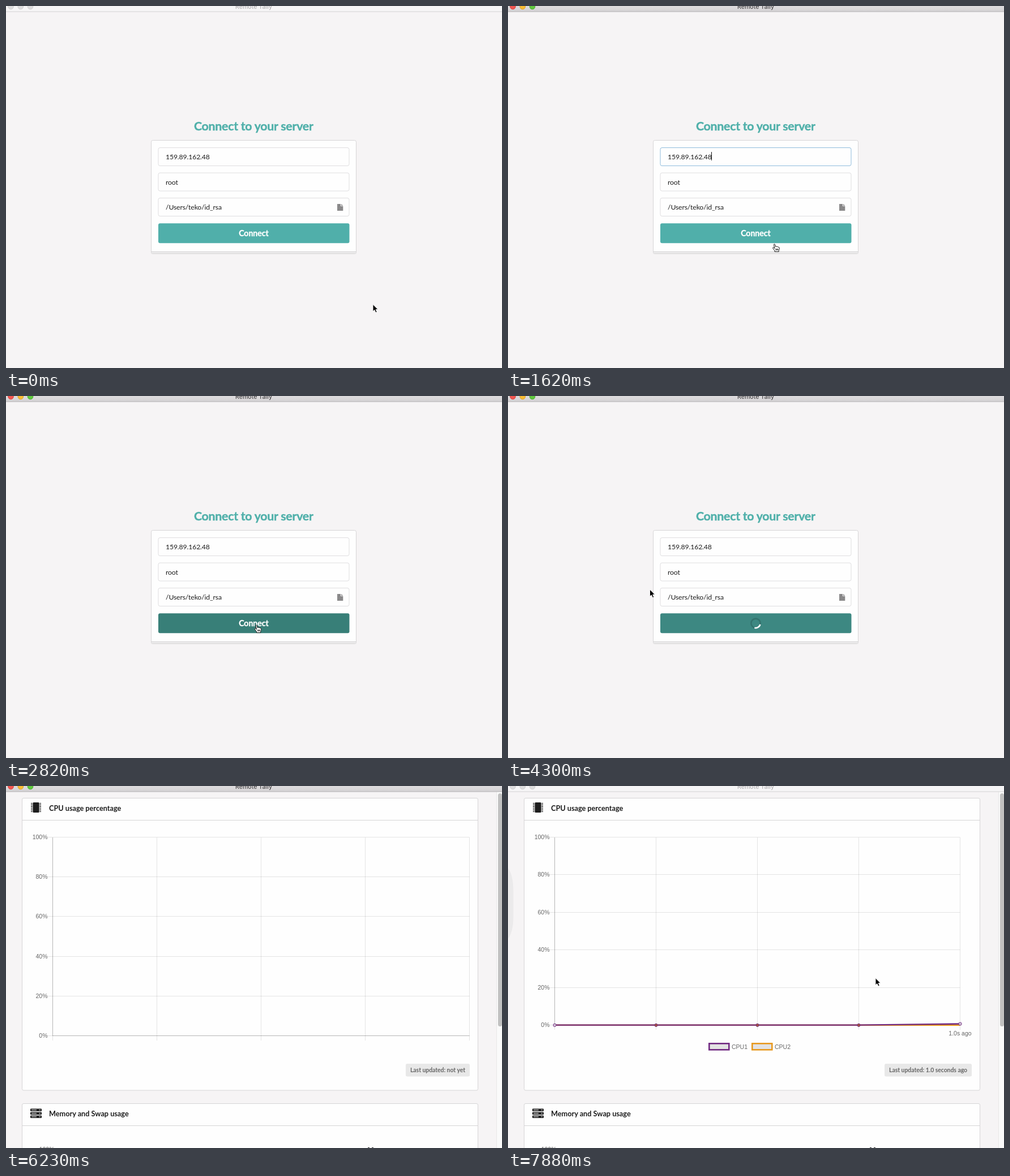
These frames come from a looping animation (876 by 640 pixels, 8000 ms). An HTML page:

```html
<!DOCTYPE html>
<html lang="en">
<head>
<meta charset="utf-8">
<title>Remote Tally</title>
<style>
  html, body { margin: 0; width: 100%; height: 100%; overflow: hidden; background: #f6f4f5; }
  svg { display: block; width: 100%; height: 100%; }
  text { font-family: Lato, sans-serif; fill: #1d1d1d; }
  .window-title { font: 500 10.6px Inter, sans-serif; text-anchor: middle; fill: #474547; }
  .inactive .window-title { fill: #b3b1b3; }
  .bar { fill: url(#bar); }
  .inactive .bar { fill: #f6f5f6; }
  .bar-line { fill: #b4b2b4; }
  .inactive .bar-line { fill: #d3d2d3; }
  .inactive .light { fill: #dddcdd; stroke: #d0cfd0; }
  .card { fill: #fefefe; stroke: #d6d5d6; }
  .field { fill: #fefefe; stroke: #dfdee0; }
  .value { font-size: 12.26px; letter-spacing: -.15px; }
  .heading {
    font-size: 21.4px; font-weight: 700; letter-spacing: -.3px; text-anchor: middle;
    fill: #50b0aa; stroke: #50b0aa; stroke-width: .4;
  }
  .action {
    font-size: 14.2px; font-weight: 700; letter-spacing: -.1px; text-anchor: middle;
    fill: #fff; stroke: #fff; stroke-width: .3;
  }
  .card-title { font-size: 12.7px; font-weight: 700; }
  .badge { font-size: 10.5px; font-weight: 700; letter-spacing: -.07px; fill: #666; text-anchor: end; }
  .chart text { font: 10.5px "Liberation Sans", Arial, sans-serif; fill: #666; }
  .grid { stroke: #000; stroke-opacity: .1; fill: none; }
  .axis { stroke: #000; stroke-opacity: .2; fill: none; }
</style>
</head>
<body>
<svg viewBox="0 0 876 640">
  <defs>
    <linearGradient id="bar" x2="0" y2="1">
      <stop stop-color="#dedcde"/><stop offset="1" stop-color="#d3d1d3"/>
    </linearGradient>
  </defs>
  <rect width="876" height="640" fill="#f6f4f5"/>

  <g id="login">
    <text class="heading" x="437.3" y="219.5">Connect to your server</text>
    <rect x="256" y="240" width="363" height="198.5" rx="3" fill="#000" opacity=".1"/>
    <rect class="card" x="256.5" y="237.5" width="362" height="199.5" rx="3"/>
    <path d="M257 434.5H618.5" stroke="#d0cfd0"/>
    <rect x="257" y="435" width="361" height="2" fill="#efeeef"/>
    <rect class="field" id="host" x="269" y="250.5" width="337" height="32" rx="3"/>
    <rect class="field" x="269" y="295" width="337" height="32" rx="3"/>
    <rect class="field" x="269" y="339.5" width="337" height="32" rx="3"/>
    <text class="value" x="282" y="270.5">159.89.162.48</text>
    <text class="value" x="282" y="315.5">root</text>
    <text class="value" x="282" y="360">/Users/teko/id_rsa</text>
    <rect id="caret" x="359" y="258" width="1" height="15" fill="#111"/>
    <path d="M585 350h6v4h4.3v8h-10.3zM592 350l3.3 3.2h-3.3z" fill="#8a898a"/>
    <rect id="button" x="269" y="384.3" width="337.5" height="35" rx="3"/>
    <text class="action" id="label" x="437.4" y="406.5">Connect</text>
    <g id="spinner" fill="none" stroke-width="2.7">
      <circle cx="437.5" cy="401.8" r="8.2" stroke="#000" stroke-opacity=".15"/>
      <path id="arc" d="M431.7 396a8.2 8.2 0 0 1 11.6 0" stroke="#fff"/>
    </g>
  </g>

  <g id="dashboard">
    <rect x="866" y="10" width="10" height="630" fill="#fafafa"/>
    <path d="M866.5 10V640" stroke="#e8e7e8"/>
    <rect x="869" y="13" width="7" height="412" rx="3.5" fill="#c1c1c1"/>
    <rect class="card" x="28.5" y="21.5" width="805" height="516.5" rx="2.5"/>
    <rect class="card" x="28.5" y="561.5" width="805" height="100" rx="2.5"/>
    <path d="M28 60.5H833M28 600.5H833" stroke="#d6d5d6"/>
    <g stroke="#1d1d1d" fill="#1d1d1d">
      <rect x="47.5" y="29.5" width="11" height="17" rx="1"/>
      <path d="M53 30V47" stroke-width="18" stroke-dasharray="1.3 1.5"/>
    </g>
    <path d="M47 29V47.5M59 29V47.5" stroke="#fefefe" stroke-width=".8"/>
    <g id="server"></g>
    <text class="card-title" x="76" y="44">CPU usage percentage</text>
    <text class="card-title" x="76" y="584">Memory and Swap usage</text>
    <g class="chart"><text x="58.7" y="645.5">100%</text></g>
    <path d="M639 639h3v1h-3zM646 639h3v1h-3z" fill="#222"/>
    <g id="empty" class="chart"></g>
    <g id="filled" class="chart"></g>
    <rect id="badge-box" y="491" height="22.5" rx="2.5" fill="#e8e8e8"/>
    <text class="badge" id="badge" x="811" y="505.8"></text>
    <path id="overlay" d="M0 145Q9.5 158 9.5 187V230Q9.5 258 0 270Z" fill="#ebeaeb"/>
  </g>

  <g id="frame">
    <rect class="bar" width="876" height="10"/>
    <rect class="bar-line" y="9.5" width="876" height="1"/>
    <circle class="light" cx="8.5" cy="1" r="4.8" fill="#f25650" stroke="#dd4640"/>
    <circle class="light" cx="25.8" cy="1" r="4.8" fill="#f8bc33" stroke="#dfa023"/>
    <circle class="light" cx="43" cy="1" r="4.8" fill="#5fc93e" stroke="#4aad2d"/>
    <text class="window-title" x="437.5" y="5.3">Remote Tally</text>
  </g>

  <g id="cursor" stroke-linejoin="round">
    <path id="arrow" d="M0 0V12.5L2.9 9.9 5 14.6 7.2 13.6 5.2 9.1H9Z" fill="#000" stroke="#fff" stroke-width=".9"/>
    <path id="hand" d="M4 14.3V12.5C2.5 10.5 1.5 9.5.8 8.2.2 7 1.7 6.2 2.6 7.2L4 8.7 2.5 2.4C2.1.6 4 .2 4.5 1.8L5.7 5.7C6.2 4.6 7.7 4.7 8 5.9 8.6 5 10 5.3 10.2 6.5 11.2 5.9 12.3 6.5 12.3 7.8 12.5 10 11.7 11.5 11.2 12.6V14.3Z M6.2 9V12M8 9V12M9.8 9V12" fill="#fff" stroke="#111"/>
  </g>
</svg>

<script>
const DURATION = 8000, TICK = 148.5;
const $ = id => document.getElementById(id);
const show = (id, on) => { $(id).style.display = on ? '' : 'none'; };
const latest = (steps, t) => steps.findLast(step => step[0] <= t);

// time, x, y, shape
const cursorSteps = [
  [0, 648, 527.5, 'arrow'], [1040, 637, 520, 'arrow'], [1190, 603, 497, 'arrow'],
  [1340, 552, 467, 'arrow'], [1480, 503, 440, 'arrow'], [1620, 467, 420, 'hand'],
  [1770, 449, 410, 'hand'], [1920, 441, 406, 'hand'], [2070, 438.5, 404, 'hand'],
  [3110, 436, 402, 'arrow'], [3260, 415, 394, 'arrow'], [3410, 368, 377, 'arrow'],
  [3560, 312, 360, 'arrow'], [3710, 270, 349, 'arrow'], [3850, 251, 345, 'arrow'],
  [4000, 240, 343, 'arrow'], [4150, 246, 342, 'arrow'], [4300, 250.5, 342, 'arrow'],
  [4450, 249, 338.5, 'arrow'], [5940, 285, 330, 'arrow'], [6080, 0, 0, 'none'],
  [6380, 560, 278, 'arrow'], [6530, 599.5, 267.5, 'arrow'],
  [7730, 636, 321, 'arrow'], [7880, 649, 339.5, 'arrow']
];
const hostBorders = [[0, '#dfdee0'], [450, '#b2cbdc'], [590, '#8fbcdc'], [2820, '#dfdee0']];
const buttonColors = [[0, '#50afaa'], [1770, '#489f99'], [2820, '#387f78'], [2970, '#3d8882']];
const badgeTexts = [[0, 'not yet'], [6380, '0.0 seconds ago'], [7130, '1.0 seconds ago']];

function gridMarkup(right, bottom) {
  const left = 82.5, top = 91;
  let grid = '', labels = '';
  for (let i = 0; i <= 5; i++) {
    const y = Math.round(bottom + (top - bottom) * i / 5) - .5;
    grid += `M74 ${y}H${right}`;
    labels += `<text x="73.5" y="${y + 3.5}" text-anchor="end">${i * 20}%</text>`;
  }
  for (let i = 0; i <= 4; i++) {
    const x = Math.floor(left + (right - left) * i / 4) + .5;
    grid += `M${x} ${top}V${bottom + 8}`;
  }
  return `<path class="grid" d="${grid}"/>${labels}
    <path class="axis" d="M${left} ${top}V${bottom}M${left} ${bottom - .5}H${right}"/>`;
}

function seriesMarkup() {
  const points = [0, 1, 2, 3, 4].map(i => {
    const fill = i % 4 ? '#a5543f' : '#d5c9d8';
    return `<circle cx="${82.5 + 179 * i}" cy="${i < 4 ? 422.8 : 420.5}" r="2.6" fill="${fill}" stroke="#712a82"/>`;
  }).join('');
  const legend = (x, color, name) =>
    `<rect x="${x + 1.3}" y="455.3" width="35" height="11" fill="#e3e2e3" stroke="${color}" stroke-width="2.6"/>
     <text x="${x + 41}" y="464.5">${name}</text>`;
  return `<g fill="none" stroke-width="2.4">
      <path d="M82.5 422.8H798.5" stroke="#e8991f"/>
      <path d="M82.5 422.6H619.5L798.5 420.5" stroke="#712a82"/>
    </g>${points}
    <text id="age" x="798.5" y="441" text-anchor="middle"></text>
    ${legend(354, '#712a82', 'CPU1')}${legend(430, '#e8991f', 'CPU2')}`;
}

$('empty').innerHTML = gridMarkup(818.5, 442);
$('filled').innerHTML = gridMarkup(798.5, 423) + seriesMarkup();
$('server').innerHTML = [570.5, 576.5, 582.5].map(y =>
  `<rect x="43" y="${y}" width="20" height="4.6" rx="1" fill="#1d1d1d"/>
   <path d="M45 ${y + 2.3}H54M58.5 ${y + 2.3}H61" stroke="#fefefe"/>`).join('');

function render(t) {
  const onDashboard = t >= 5490, loading = t >= 2970, hasData = t >= 6380;
  $('frame').classList.toggle('inactive', t < 450 || t >= 7280);
  show('login', !onDashboard);
  show('dashboard', onDashboard);

  $('host').style.stroke = latest(hostBorders, t)[1];
  $('button').style.fill = latest(buttonColors, t)[1];
  show('caret', (t >= 450 && t < 1040) || (t >= 1480 && t < 2070) || (t >= 2520 && t < 2820));
  show('label', !loading);
  show('spinner', loading);
  // The spinner turns once per 600 ms, seen only at each tick.
  const tick = Math.floor((t + 14) / TICK);
  const angle = 150 + (tick - 29) * TICK * .6;
  $('arc').setAttribute('transform', `rotate(${angle} 437.5 401.8)`);

  show('empty', !hasData);
  show('filled', hasData);
  show('overlay', t >= 7280);
  $('age').textContent = t < 7130 ? '0.0s ago' : '1.0s ago';
  $('badge').textContent = 'Last updated: ' + latest(badgeTexts, t)[1];
  if (onDashboard) {
    const width = $('badge').getComputedTextLength() + 16;
    $('badge-box').setAttribute('x', 819 - width);
    $('badge-box').setAttribute('width', width);
  }

  const [, x, y, shape] = latest(cursorSteps, t);
  $('cursor').setAttribute('transform', `translate(${x} ${y})`);
  show('arrow', shape === 'arrow');
  show('hand', shape === 'hand');
}

const start = performance.now();
function loop() {
  render((performance.now() - start) % DURATION);
  requestAnimationFrame(loop);
}
loop();
</script>
</body>
</html>
```
